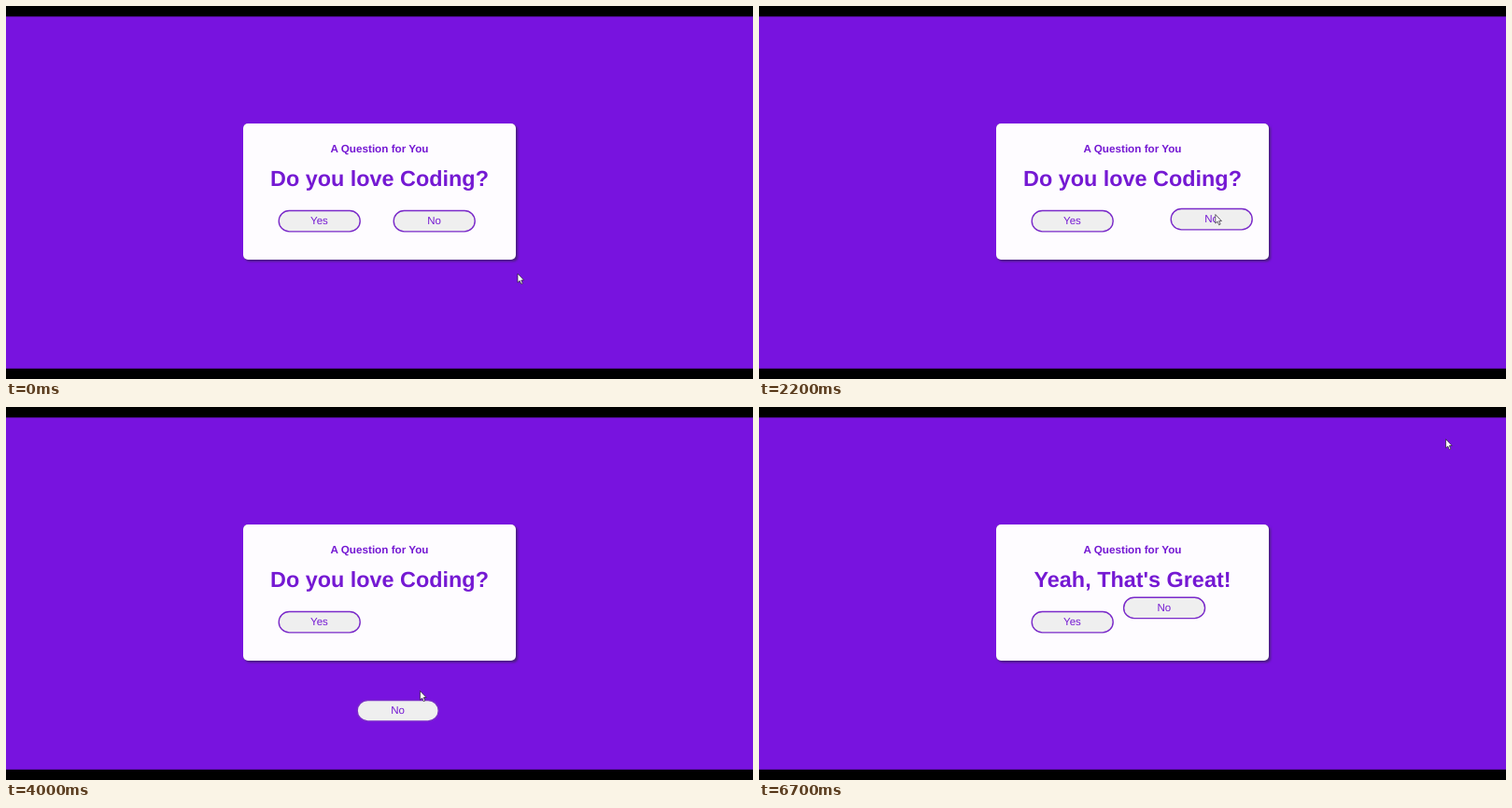
An HTML page for the animation above (6.8 s loop, 800 by 400 pixels).

```html
<!DOCTYPE html>
<html lang="en">
<head>
<meta charset="utf-8">
<style>
  html, body { margin: 0; width: 100%; height: 100%; overflow: hidden; background: #000; }
  svg { display: block; width: 800px; height: 400px; }
  text {
    font-family: "Liberation Sans", Arial, sans-serif;
    text-anchor: middle; text-rendering: geometricPrecision; fill: #7519d3;
  }
  .card {
    fill: #fefcff;
    filter: drop-shadow(0 0 .6px rgba(25, 5, 60, .7)) drop-shadow(2px 2px 1.2px rgba(50, 35, 80, .65));
  }
  .heading { font-weight: bold; }
  .button rect { fill: #efefef; stroke: #7a2ac9; stroke-width: 1.4; }
  .button text { font-size: 11.5px; }
  .hover rect { fill: #a868e8; }
  .hover text { fill: #fff; }
</style>
</head>
<body>
<svg viewBox="0 0 800 400">
  <defs>
    <rect id="pill" x=".2" y=".5" width="87" height="22.4" rx="11.2"/>
  </defs>
  <rect y="11.3" width="800" height="377.5" fill="#7813df"/>
  <rect class="card" x="254" y="126" width="292" height="146" rx="5"/>
  <text class="heading" x="400" y="157" font-size="11.7">A Question for You</text>
  <text class="heading" id="title" x="400" y="193" font-size="23.4"></text>
  <g class="button" id="yes" transform="translate(292 219)">
    <rect x=".2" y=".5" width="87" height="22.4" rx="11.2"/>
    <text x="43.5" y="15.4">Yes</text>
  </g>
  <g class="button" id="no">
    <rect x=".2" y=".5" width="87" height="22.4" rx="11.2"/>
    <text x="43.5" y="15.4">No</text>
  </g>
  <path id="cursor" d="M0 0V9.5L2.2 7.6 3.8 11.2 5.3 10.5 3.8 7H6.6Z" fill="#fff" stroke="#28202f" stroke-width=".7"/>
</svg>
<script>
const LOOP = 6800, STEP = 100, CLICK = 5400;
const $ = id => document.getElementById(id);
const at = (time, x, y) => ({ time, x, y });

// Where the No button lands each time it escapes
const hops = [
  at(0, 415, 219), at(500, 400, 277), at(1000, 441, 217), at(2400, 352, 146),
  at(3000, 369.5, 264.5), at(3600, 376, 314), at(4300, 390.4, 203.7)
];

// The pointer touches the button's right part at the moment it escapes
const catches = hops.slice(1).map((hop, i) => at(hop.time, hops[i].x + 70, hops[i].y + 10));

// Between and after the catches it wanders, clicks Yes and leaves
const pointer = [
  ...catches,
  at(0, 548, 287), at(1600, 369, 205), at(2700, 469, 140), at(3400, 451, 261),
  at(4600, 414, 294), at(CLICK, 339, 222), at(5700, 339, 222), at(LOOP, 745, 30)
].sort((a, b) => a.time - b.time);

const place = (el, { x, y }) => el.setAttribute("transform", `translate(${x} ${y})`);

function glide(path, t) {
  const i = path.findIndex(p => p.time > t);
  const a = path[i - 1], b = path[i];
  const k = (t - a.time) / (b.time - a.time);
  const eased = k * k * (3 - 2 * k);
  return { x: a.x + (b.x - a.x) * eased, y: a.y + (b.y - a.y) * eased };
}

function draw(now) {
  const t = Math.floor(now % LOOP / STEP) * STEP;
  const tip = glide(pointer, t);
  place($("cursor"), tip);
  place($("no"), hops.findLast(hop => hop.time <= t));
  const overYes = Math.abs(tip.x - 336) < 44 && Math.abs(tip.y - 231) < 12;
  $("yes").classList.toggle("hover", overYes);
  $("title").textContent = t < CLICK ? "Do you love Coding?" : "Yeah, That's Great!";
}

const start = performance.now();
function tick() {
  draw(performance.now() - start);
  requestAnimationFrame(tick);
}
tick();
</script>
</body>
</html>
```
